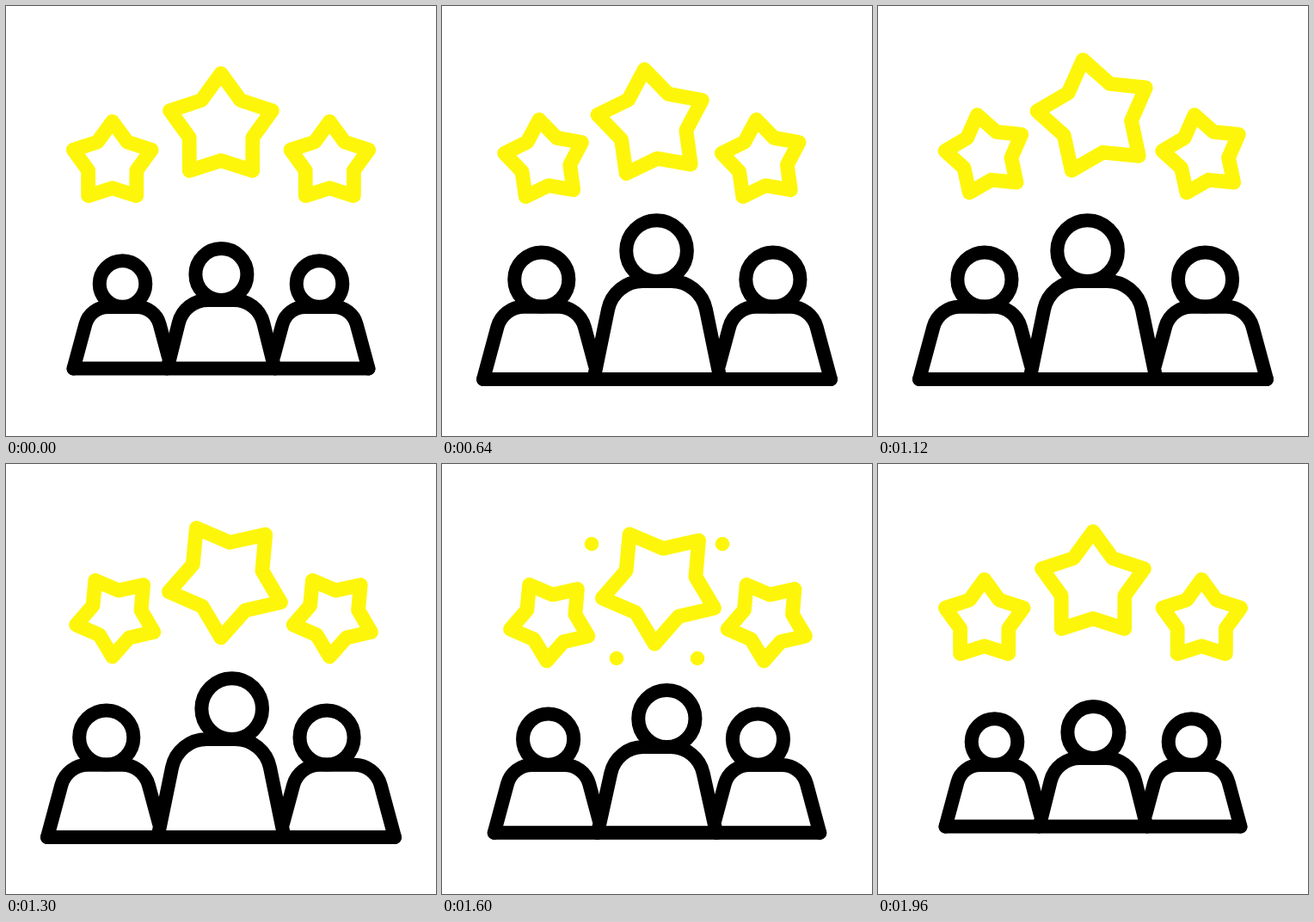
Recreate the animation shown at these times as an HTML page with a canvas. Size 500x500 px, loop 2000 ms.

```html
<!DOCTYPE html>
<html lang="en">
<head>
<meta charset="utf-8">
<title>Team rating</title>
<style>
html, body { margin: 0; width: 100%; height: 100%; overflow: hidden; background: #fff; }
canvas { display: block; width: 500px; height: 500px; }
</style>
</head>
<body>
<canvas id="stage" width="500" height="500"></canvas>
<script>
const LOOP = 2000, START = 173, END = 1915;
const YELLOW = '#fdf60a', CENTER = 250, PIVOT_Y = 351, FLOOR = 421.5;
const ctx = document.getElementById('stage').getContext('2d');

// Smooth step from 0 to 1 between two times.
function ease(t, from, to) {
  const x = Math.min(1, Math.max(0, (t - from) / (to - from)));
  return x * x * (3 - 2 * x);
}

// Rises to 1, holds, and falls back to 0.
const pulse = (t, rise, full, fall, end) => ease(t, rise, full) - ease(t, fall, end);

// Turns about the middle of the star's bounding box.
function star(x, y, radius, angle) {
  const offset = radius * 0.0955;
  ctx.save();
  ctx.translate(x, y);
  ctx.rotate(angle);
  ctx.beginPath();
  for (let i = 0; i < 10; i++) {
    const r = i % 2 ? radius * 0.62 : radius, a = i * Math.PI / 5;
    ctx.lineTo(r * Math.sin(a), offset - r * Math.cos(a));
  }
  ctx.closePath();
  ctx.stroke();
  ctx.restore();
}

function circle(x, y, r) {
  ctx.beginPath();
  ctx.arc(x, y, r, 0, 2 * Math.PI);
}

function stars(t) {
  const spin = 2 * Math.PI * ease(t, START, END);
  for (const side of [-1, 1]) star(CENTER + side * 126.3, 177.5, 47.7, spin);
  star(CENTER, 135, 62.5 + 6.3 * pulse(t, START, 1400, 1580, 1940), spin);
}

function dots(t) {
  const r = 8.3 * pulse(t, 1400, 1540, 1660, 1820);
  for (const side of [-1, 1]) {
    circle(CENTER + side * 76, 93, r);
    ctx.fill();
    circle(CENTER + side * 47, 226, r);
    ctx.fill();
  }
}

function people(t) {
  const grow = pulse(t, START, 585, 1350, END);
  const scale = 1 + 0.178 * grow, lift = 20.5 * grow;
  const leanLeft = pulse(t, 600, 900, 950, 1400);
  const leanRight = pulse(t, 950, 1400, 1400, END);
  const X = dx => CENTER + scale * dx;
  const Y = y => PIVOT_Y + scale * (y - PIVOT_Y);

  function head(dx, y, r, shift) {
    circle(X(dx) + shift, y, r * scale);
    ctx.stroke();
  }

  // Trapezoid with round shoulders; cut shortens the second leg.
  function body(foot1, foot2, inset, top, radius, cut) {
    const a = X(foot1), b = X(foot2), floor = Y(FLOOR);
    const step = Math.sign(b - a) * inset * scale;
    ctx.beginPath();
    ctx.moveTo(a, floor);
    ctx.arcTo(a + step, top, b - step, top, radius * scale);
    ctx.arcTo(b - step, top, b, floor, radius * scale);
    ctx.lineTo(b - step * cut, floor + (top - floor) * cut);
    ctx.stroke();
  }

  for (const side of [-1, 1]) {
    const shift = side < 0 ? 13 * leanLeft : -13.5 * leanRight;
    body(side * 171.5, side * 57.5, 19.3, Y(350), 27, 0.19);
    head(side * 114.5, Y(323), 26.8, shift);
  }
  body(-62.5, 62.5, 19.9, Y(342) - lift, 35, 0);
  head(0.4, Y(312) - lift, 30, 16.5 * leanRight - 18 * leanLeft);

  ctx.beginPath();
  ctx.moveTo(X(-171.5), Y(FLOOR));
  ctx.lineTo(X(171.5), Y(FLOOR));
  ctx.stroke();
}

function draw(t) {
  ctx.clearRect(0, 0, 500, 500);
  ctx.lineCap = ctx.lineJoin = 'round';
  ctx.lineWidth = 16.8;
  ctx.strokeStyle = ctx.fillStyle = YELLOW;
  stars(t);
  dots(t);
  ctx.lineWidth = 16;
  ctx.strokeStyle = '#000';
  people(t);
}

const start = performance.now();
function frame() {
  draw((performance.now() - start) % LOOP);
  requestAnimationFrame(frame);
}
frame();
</script>
</body>
</html>
```
